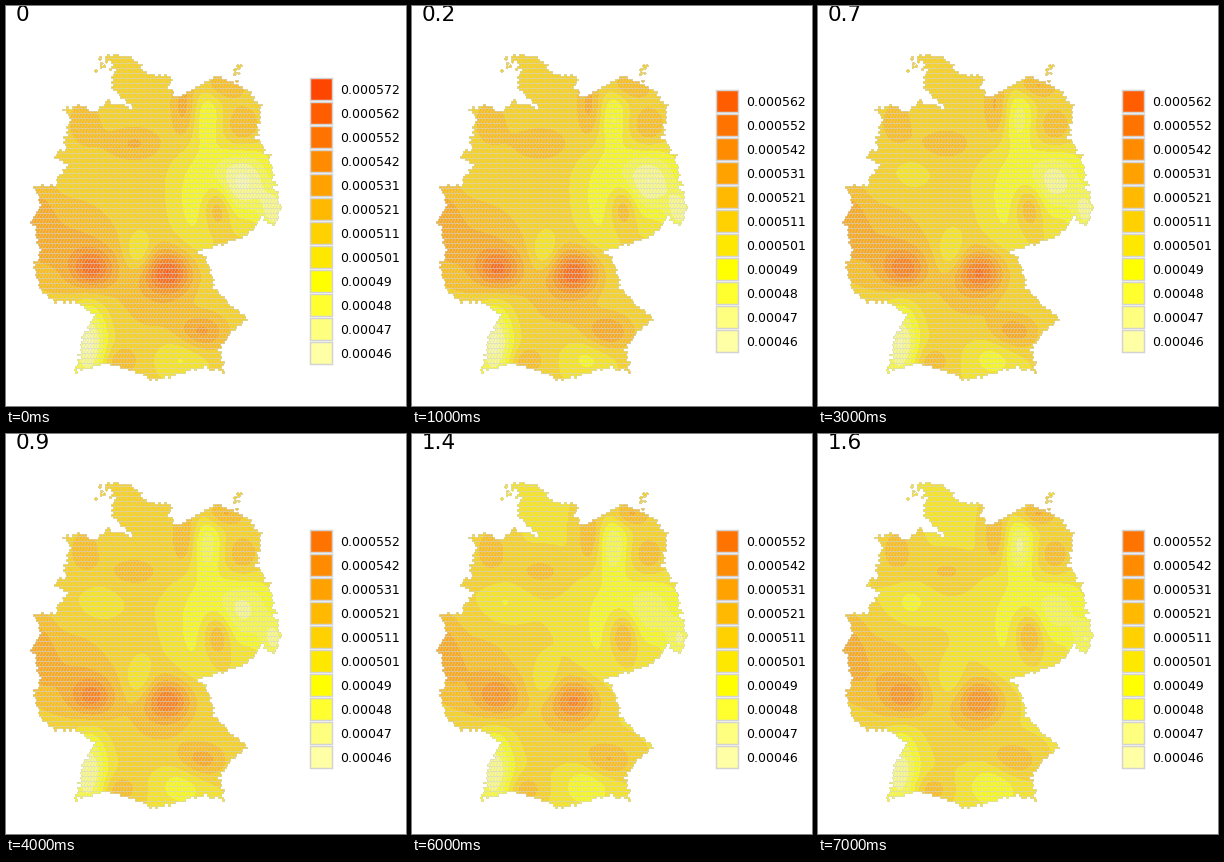
A matplotlib script that plays this animation: 400 by 400 pixels, repeating every 8 s.

```python
import numpy as np
import matplotlib.pyplot as plt
from matplotlib.animation import FuncAnimation
from matplotlib.patches import Rectangle
from matplotlib.path import Path

SIZE, DPI, STEPS = 400, 100, 8
GREY = np.array([211, 211, 211]) / 255
CELL_W, CELL_H = 3, 2.5

# Key points of the border, clockwise from the northern tip
OUTLINE = [
    (98, 48), (113, 49), (131, 53), (139, 67), (166, 69), (163, 81), (172, 90),
    (190, 83), (208, 69), (238, 80), (255, 98), (252, 130), (264, 150),
    (268, 178), (275, 200), (269, 222), (256, 212), (240, 229), (204, 243),
    (194, 246), (204, 262), (208, 282), (242, 314), (230, 323), (213, 342),
    (220, 366), (199, 362), (165, 370), (144, 376), (138, 369), (116, 362),
    (98, 357), (70, 366), (77, 328), (88, 307), (70, 297), (46, 296), (33, 281),
    (27, 261), (34, 246), (25, 216), (34, 200), (28, 180), (45, 179), (61, 160),
    (47, 148), (58, 143), (63, 115), (57, 102), (80, 98), (90, 107), (100, 93),
    (128, 104), (108, 84), (104, 72), (110, 66),
]
ISLAND_GROUPS = [(96, 56), (231, 67)]

# Hills and dips: x, y, spread x, spread y, height at the start and at the end
BASE = 4.8, 4.35
BUMPS = [
    (86, 263, 15, 14, 4.2, 2.7), (62, 240, 34, 34, 1.9, 1.9),
    (32, 212, 12, 28, 1.6, 1.7), (162, 266, 17, 15, 5.0, 3.5),
    (148, 285, 28, 34, 1.2, 0.8), (195, 326, 17, 13, 3.0, 2.2),
    (177, 100, 9, 24, 2.2, 2.1), (128, 137, 20, 12, 1.8, 1.3),
    (236, 122, 13, 16, 1.8, 1.9), (211, 200, 10, 16, 2.8, 3.2),
    (217, 79, 15, 9, 1.8, 2.4), (78, 116, 14, 20, 1.2, 1.6),
    (112, 355, 13, 10, 1.6, 1.8), (235, 175, 22, 24, -4.6, -2.4),
    (201, 110, 10, 20, -2.0, -3.0), (268, 206, 10, 16, -3.5, -2.5),
    (82, 338, 13, 28, -4.8, -3.6), (187, 195, 16, 45, -1.6, -1.0),
    (133, 246, 10, 15, -2.2, -1.4), (175, 350, 18, 16, -1.6, -2.0),
    (92, 168, 14, 14, 0.0, -1.3),
]

PALETTE = np.array([(255, 255, b) for b in (165, 127, 48)]
                   + [(255, 255 - 23.18 * k, 0) for k in range(9)]) / 255

yy, xx = np.mgrid[0:SIZE, 0:SIZE]
row = (yy / CELL_H).astype(int)


def land_mask():
    """Land with a rough border, cut along the cells of a staggered grid."""
    rng = np.random.default_rng(4)
    shift = CELL_W / 2 * (row % 2)
    col = np.floor((xx + shift) / CELL_W).astype(int)
    rough_x = rng.uniform(-2, 2, row.max() + 1)[row]
    rough_y = rng.uniform(-1.5, 1.5, col.max() + 1)[col]
    cx = (col + 0.5) * CELL_W - shift + rough_x
    cy = (row + 0.5) * CELL_H + rough_y
    land = Path(OUTLINE).contains_points(np.c_[cx.ravel(), cy.ravel()])
    land = land.reshape(xx.shape)
    for x, y in ISLAND_GROUPS:
        for dx, dy in rng.normal(0, (3, 5), (9, 2)):
            land |= np.hypot(xx - x - dx, yy - y - dy) < 1.8
    return land


def mesh_weight(land):
    """Share of grey in each pixel from the cell borders."""
    weight = np.where((xx + 2 * (row % 2)) % CELL_W == 0, 0.5, 0.16)
    weight[yy % 5 == 2] = 0.68
    inner = land.copy()
    for axis in (0, 1):
        for step in (-1, 1):
            inner &= np.roll(land, step, axis)
    weight[land & ~inner] = 0.68
    return weight[..., None]


def surfaces():
    """Height field at the start and at the end."""
    start, end = (np.full(xx.shape, b) for b in BASE)
    for x, y, sx, sy, a, b in BUMPS:
        g = np.exp(-0.5 * (((xx - x) / sx) ** 2 + ((yy - y) / sy) ** 2))
        start += a * g
        end += b * g
    return start, end


LAND = land_mask()
MESH = mesh_weight(LAND)
START, END = surfaces()


def map_image(i, top):
    u = i / (STEPS - 1)
    level = np.clip(np.rint(START + (END - START) * u), 0, top).astype(int)
    rgb = PALETTE[level] * (1 - MESH) + GREY * MESH
    rgb[~LAND] = 1
    return rgb


fig = plt.figure(figsize=(SIZE / DPI, SIZE / DPI), dpi=DPI, facecolor="white")
ax = fig.add_axes([0, 0, 1, 1])
ax.axis("off")
image = ax.imshow(np.ones((SIZE, SIZE, 3)), extent=(0, SIZE, SIZE, 0),
                  interpolation="nearest", aspect="auto")
ax.set_xlim(0, SIZE)
ax.set_ylim(SIZE, 0)
title = ax.text(10, 15.3, "", fontsize=15.5, family="DejaVu Sans", va="baseline")
keys = []
for k, color in enumerate(PALETTE):
    label = f"{(459.7 + 10.23 * k) / 1e6:.6f}".rstrip("0")
    box = ax.add_patch(Rectangle((304, 0), 22, 22, facecolor=color,
                                 edgecolor=GREY, linewidth=1.48 * 72 / DPI))
    text = ax.text(334.2, 0, label, fontsize=9, family="DejaVu Sans", va="baseline")
    keys.append((box, text))


def update(i):
    top = 11 if i == 0 else 10 if i < 4 else 9
    image.set_data(map_image(i, top))
    title.set_text(f"{round(i * 0.7 / 3, 1):g}")
    for k, (box, text) in enumerate(keys):
        y = 215 + 24 * (top / 2 - k)
        box.set_y(y - 11)
        text.set_y(y + 5)
        box.set_visible(k <= top)
        text.set_visible(k <= top)
    return [image, title]


anim = FuncAnimation(fig, update, frames=STEPS, interval=1000, repeat=True,
                     repeat_delay=0, blit=False)
plt.show()
```
